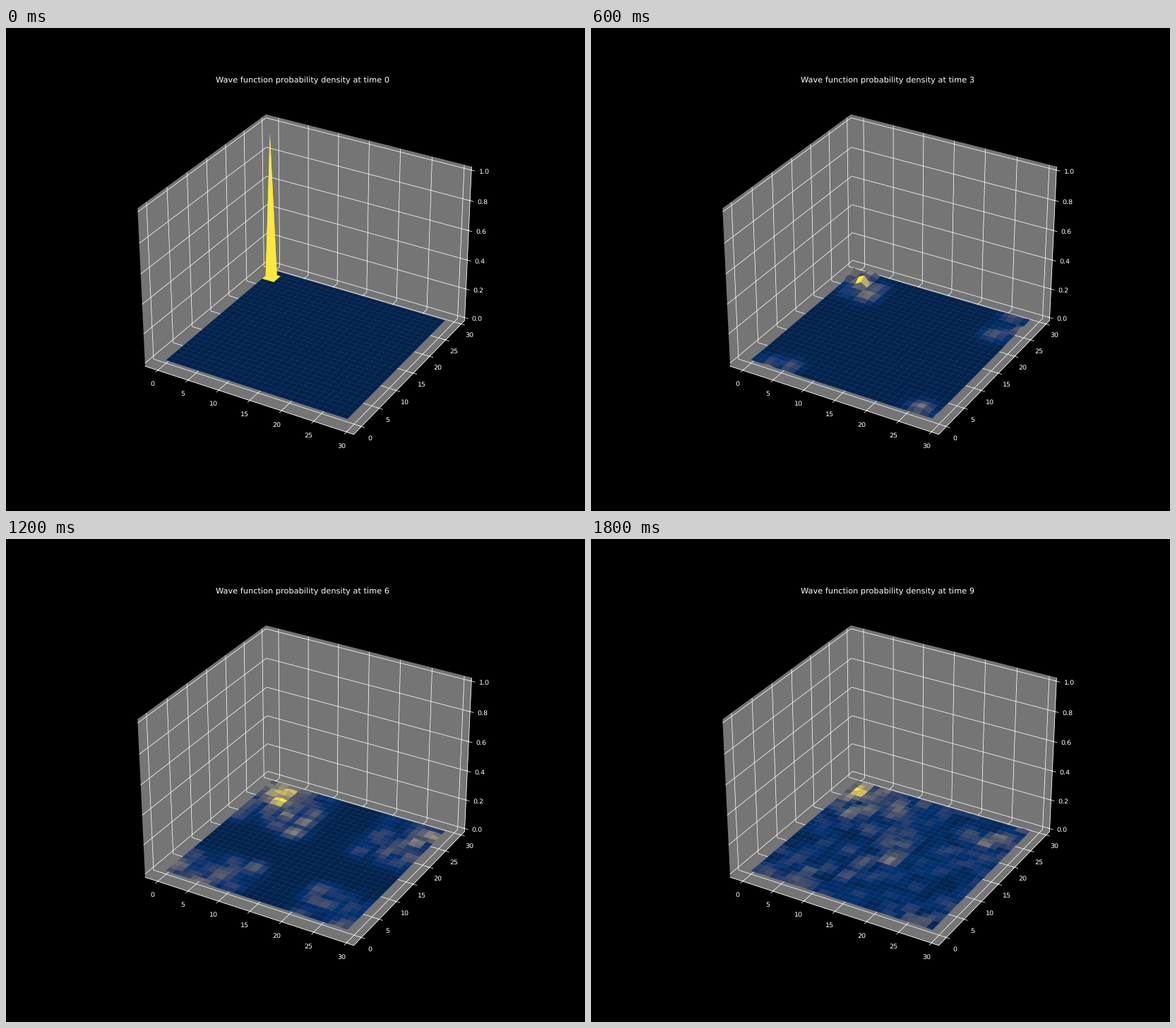
Write a matplotlib script that moves like this. It is 820 px wide and 683 px high and loops after 2000 ms.

```python
import numpy as np
import matplotlib.pyplot as plt
from matplotlib.animation import FuncAnimation

SIZE = 30
STEPS = 10
START_X, START_Y = 1, 27
HOP = np.pi / 3      # mixing angle between neighbouring sites
DISORDER = 0.6       # spread of the random site phases, in radians
DPI = 820 / 12


def hop(psi, axis, first, angle):
    """Mix the sites of each neighbouring pair along one axis of the torus."""
    rows = np.roll(np.moveaxis(psi, axis, 0), -first, axis=0)
    pairs = rows.reshape(SIZE // 2, 2, SIZE)
    pairs = np.cos(angle) * pairs + 1j * np.sin(angle) * pairs[:, ::-1]
    rows = np.roll(pairs.reshape(SIZE, SIZE), first, axis=0)
    return np.moveaxis(rows, 0, axis)


def step(psi, phases):
    """Half a hop on one pairing, a whole one on the other, half again."""
    for shift, angle in ((0, HOP / 2), (1, HOP), (0, HOP / 2)):
        psi = hop(psi, 1, shift, angle)
        psi = hop(psi, 0, 1 - shift, angle)
    return psi * phases


def walk():
    rng = np.random.default_rng(4)
    phases = np.exp(1j * DISORDER * rng.standard_normal((SIZE, SIZE)))
    psi = np.zeros((SIZE, SIZE), complex)
    psi[START_Y, START_X] = 1
    for _ in range(STEPS):
        yield abs(psi) ** 2
        psi = step(psi, phases)


plt.style.use("dark_background")
plt.rcParams["text.hinting"] = "none"
fig = plt.figure(figsize=(820 / DPI, 683 / DPI), dpi=DPI)
ax = fig.add_subplot(projection="3d")
pad = 0.05 * (SIZE - 1)
ax.set_xlim(-pad, SIZE - 1 + pad, view_margin=1 / 48)
ax.set_ylim(-pad, SIZE - 1 + pad, view_margin=1 / 48)
ax.set_zlim(0, 1, view_margin=1 / 48)
for axis in (ax.xaxis, ax.yaxis, ax.zaxis):
    axis.set_pane_color("#757575")

X, Y = np.meshgrid(np.arange(SIZE), np.arange(SIZE))
densities = list(walk())


def draw(t):
    for surface in list(ax.collections):
        surface.remove()
    ax.plot_surface(X, Y, densities[t], cmap="cividis")
    ax.set_title(f"Wave function probability density at time {t}")


anim = FuncAnimation(fig, draw, frames=STEPS, init_func=lambda: None,
                     interval=200, repeat=True, repeat_delay=0)
plt.show()
```
